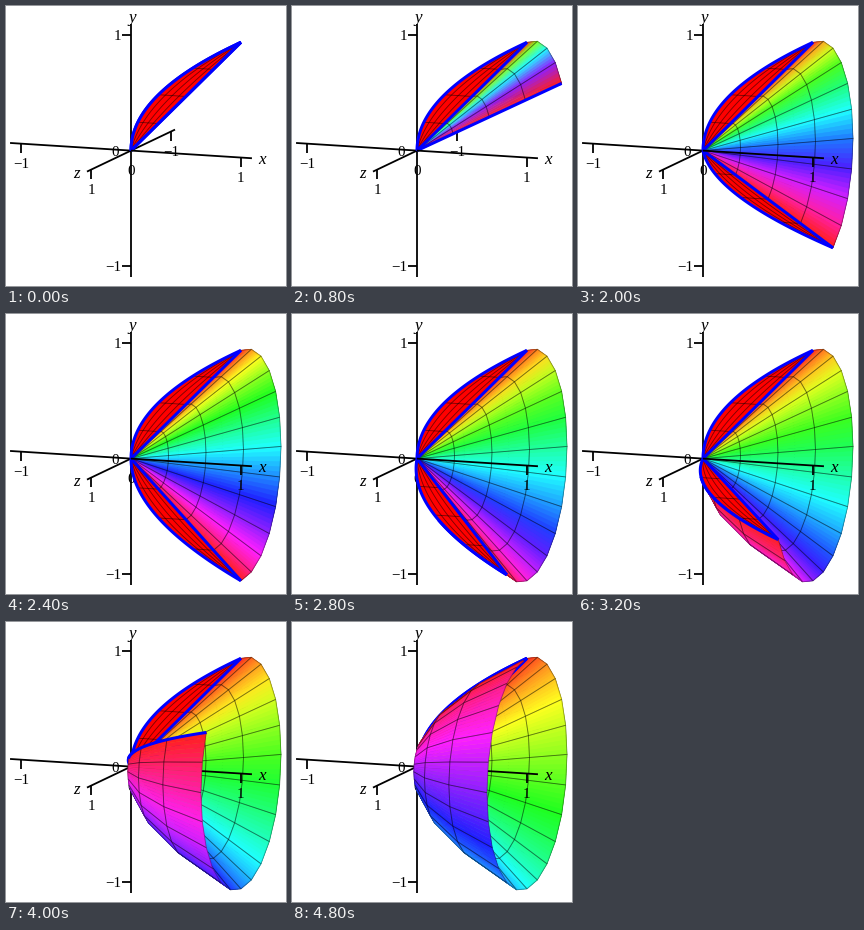
A matplotlib script that plays this animation: 280 px wide and 280 px high, repeating every 5000 ms.

```python
import numpy as np
import matplotlib.pyplot as plt
from matplotlib.animation import FuncAnimation
from matplotlib.collections import LineCollection, PolyCollection
from matplotlib.colors import hsv_to_rgb

SIZE, DPI = 280, 80
PX = 72 / DPI
FRAMES, INTERVAL = 25, 200
STEP = np.radians(15)
SCALE, ORIGIN = 117, np.array([125, 144.6])
TURN, TILT = np.radians(20), np.radians(10)
CAMERA = np.array([np.sin(TURN) * np.cos(TILT), np.sin(TILT),
                   np.cos(TURN) * np.cos(TILT)])
RADII = np.linspace(0, 1, 5)
FINE = np.linspace(0, 1, 60)
STRIPS = 6
SATURATION = 0.88
MESH = (0, 0, 0, 0.5)
AXIS_WIDTH = 1.8

plt.rcParams["font.family"] = "Liberation Serif"
fig = plt.figure(figsize=(SIZE / DPI, SIZE / DPI), dpi=DPI, facecolor="white")
ax = fig.add_axes([0, 0, 1, 1])


def project(x, y, z):
    """Orthographic view of the 3D point, in stage pixels."""
    across = x * np.cos(TURN) - z * np.sin(TURN)
    depth = x * np.sin(TURN) + z * np.cos(TURN)
    down = depth * np.sin(TILT) - y * np.cos(TILT)
    return np.stack(np.broadcast_arrays(ORIGIN[0] + SCALE * across,
                                        ORIGIN[1] + SCALE * down), -1)


def revolve(x, r, angle):
    return project(x, r * np.cos(angle), -r * np.sin(angle))


def cone(r, angle):
    return revolve(r, r, angle)


def bowl(r, angle):
    return revolve(r ** 2, r, angle)


def signed_area(p):
    q = np.roll(p, -1, axis=0)
    return np.sum(p[:, 0] * q[:, 1] - p[:, 1] * q[:, 0])


def quad(surface, r0, r1, a0, a1):
    return np.array([surface(r0, a0), surface(r1, a0),
                     surface(r1, a1), surface(r0, a1)])


def line(points, width, color, z):
    points = np.asarray(points)
    ax.plot(points[:, 0], points[:, 1], color=color, lw=width * PX, zorder=z,
            solid_capstyle="butt", solid_joinstyle="round")


def label(x, y, text, z, style="normal", size=15):
    ax.text(x, y, text, fontsize=size * PX, style=style, zorder=z,
            ha="center", va="center_baseline")


def tick(point, text, z):
    x, y = point
    line([(x, y), (x, y + 9)], AXIS_WIDTH, "black", z)
    label(x, y + 19, text, z)


def draw_back_axes():
    for start, end in (((-1.1, 0, 0), (0, 0, 0)), ((0, -1.1, 0), (0, 1.1, 0)),
                       ((0, 0, -1.1), (0, 0, 1.1))):
        line([project(*start), project(*end)], AXIS_WIDTH, "black", 1)
    tick(project(-1, 0, 0), "\u22121", 1)
    tick(project(0, 0, 1), "1", 1)
    tick(project(0, 0, -1), "\u22121", 1)
    for value, text, x in ((1, "1", 111), (-1, "\u22121", 107)):
        y = project(0, value, 0)[1]
        line([(116, y), (125, y)], AXIS_WIDTH, "black", 1)
        label(x, y, text, 1)
    label(109.5, 145, "0", 1)
    label(125.5, 164, "0", 1)
    label(126, 9.5, "y", 1, "italic", 17)
    label(70.5, 166, "z", 1, "italic", 17)


def draw_front_axis(z):
    line([project(0, 0, 0), project(1.1, 0, 0)], AXIS_WIDTH, "black", z)
    tick(project(1, 0, 0), "1", z)
    label(255.5, 152.5, "x", z, "italic", 17)


def draw_surface(surface, sectors, facing, z_back, z_front):
    fills = {z_back: ([], []), z_front: ([], [])}
    outlines = {z_back: [], z_front: []}
    for i in range(sectors):
        c0, c1 = (hsv_to_rgb((h % 1, SATURATION, 1))
                  for h in (i / sectors, (i + 1) / sectors))
        for r0, r1 in zip(RADII[:-1], RADII[1:]):
            cell = quad(surface, r0, r1, i * STEP, (i + 1) * STEP)
            z = z_front if signed_area(cell) * facing > 0 else z_back
            outlines[z].append(cell)
            for s in range(STRIPS):
                t0, t1 = s / STRIPS, (s + 1) / STRIPS
                # strips stay on the flat facet
                fills[z][0].append([cell[0] + t0 * (cell[3] - cell[0]),
                                    cell[1] + t0 * (cell[2] - cell[1]),
                                    cell[1] + t1 * (cell[2] - cell[1]),
                                    cell[0] + t1 * (cell[3] - cell[0])])
                mid = (t0 + t1) / 2
                fills[z][1].append(c0 * (1 - mid) + c1 * mid)
    for z, (polys, colors) in fills.items():
        if polys:
            ax.add_collection(PolyCollection(polys, facecolors=colors, zorder=z,
                                             edgecolors=colors, lw=0.4))
            # neighbouring cells share edges, so each is stroked at part strength
            ax.add_collection(PolyCollection(outlines[z], facecolors="none",
                                             edgecolors=(0, 0, 0, 0.3),
                                             lw=0.9 * PX, zorder=z + 0.1))


def draw_blade(angle, z):
    edge = np.vstack([bowl(FINE, angle), cone(FINE[::-1], angle)])
    ax.fill(edge[:, 0], edge[:, 1], color="red", lw=0, zorder=z)
    ribs = [[bowl(r, angle), cone(r, angle)] for r in RADII[1:-1]]
    for t in RADII[1:-1]:
        ribs.append(revolve((1 - t) * FINE ** 2 + t * FINE, FINE, angle))
    ax.add_collection(LineCollection(ribs, colors=[MESH], lw=0.9 * PX, zorder=z + 0.1))


def outline_curve(surface, angle, z, r=FINE):
    line(surface(r, angle), 3, "blue", z)


def draw(frame):
    ax.cla()
    ax.set(xlim=(0, SIZE), ylim=(SIZE, 0))
    ax.axis("off")
    end = frame * STEP
    draw_back_axes()
    draw_surface(bowl, frame, -1, 2, 9)
    draw_surface(cone, frame, 1, 3, 5)

    draw_blade(0, 6)
    outline_curve(bowl, 0, 6.5)
    outline_curve(cone, 0, 6.5)

    end_visible = -CAMERA[1] * np.sin(end) - CAMERA[2] * np.cos(end) > 0
    if end_visible:
        draw_blade(end, 7)
    outline_curve(bowl, end, 7.5 if end_visible else 4)
    outline_curve(cone, end, 7.5)
    draw_front_axis(8)

    # part of the sweeping edge that lies on the near side of the bowl
    lean = CAMERA[1] * np.cos(end) - CAMERA[2] * np.sin(end)
    near = FINE[2 * FINE * lean > CAMERA[0]]
    if len(near) > 1:
        outline_curve(bowl, end, 10, near)
    return []


anim = FuncAnimation(fig, draw, frames=FRAMES, interval=INTERVAL,
                     init_func=lambda: [], repeat=True, repeat_delay=0)
plt.show()
```
